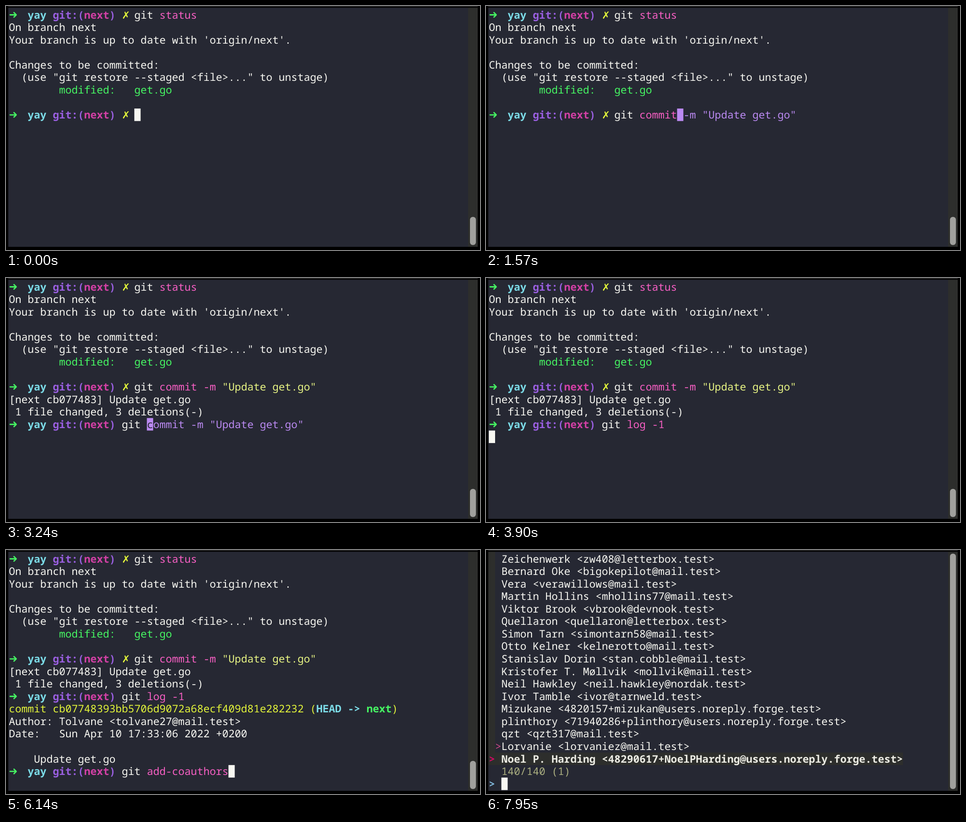
Recreate the animation shown at these times as an HTML page. Size 1041 px wide and 538 px high, loop 8000 ms.

```html
<!DOCTYPE html>
<html lang="en">
<head>
<meta charset="utf-8">
<title>Terminal session</title>
<style>
  html, body { margin: 0; width: 100%; height: 100%; overflow: hidden; background: #000; }
  svg { display: block; }
  text {
    font: 500 22.97px "Noto Sans Mono", "DejaVu Sans Mono", monospace;
    white-space: pre;
    text-rendering: geometricPrecision;
  }
  .bold { font-weight: 600; }
  .cross { font-family: "DejaVu Sans", sans-serif; font-size: 22px; }
</style>
</head>
<body>
<svg id="screen" width="1041" height="538" viewBox="0 0 1041 538"></svg>
<script>
const LOOP = 8000;
const CELL_W = 13.782, CELL_H = 27.57, LEFT = 6.2, TOP = 5.5;
const C = {
  bg: '#262833', fg: '#f8f8f2', green: '#46f663', cyan: '#7cdce8', violet: '#9a5fe0',
  magenta: '#d340a6', lime: '#e3f53a', pink: '#f85fc4', straw: '#e9f684',
  hint: '#bb8af2', panel: '#2d2e2c', thumb: '#a0a09d', count: '#abaf80',
  current: '#ecece4', pointer: '#cf0b62', marker: '#d24a86', blue: '#7fb6d9'
};

const x = col => LEFT + col * CELL_W;
const y = row => TOP + row * CELL_H;
const esc = s => s.replace(/&/g, '&amp;').replace(/</g, '&lt;').replace(/>/g, '&gt;');
const rect = (left, top, w, h, fill, r = 0) =>
  `<rect x="${left}" y="${top}" width="${w}" height="${h}" rx="${r}" fill="${fill}"/>`;
const text = (row, col, s, fill = C.fg, cls = '') =>
  `<text x="${x(col)}" y="${y(row) + 22}" fill="${fill}" class="${cls}">${esc(s)}</text>`;
const bold = (row, col, s, fill) => text(row, col, s, fill, 'bold');
const cursor = (row, col, fill = C.fg) => rect(x(col), y(row), CELL_W, CELL_H, fill);

function backdrop(thumbTop) {
  return rect(0, 0, 1041, 538, '#000') + rect(5, 0, 1031, 2, '#262626') +
    rect(5, 4, 1010, 527, C.bg) + rect(1015, 4, 21, 527, C.panel) +
    rect(1019, thumbTop, 13, 527 - thumbTop, C.thumb, 6);
}

function prompt(row, dirty) {
  const mid = y(row) + 14;
  return `<path d="M9 ${mid}H22M17.5 ${mid - 5}l5 5l-5 5" fill="none" stroke="${C.green}"
      stroke-width="2.8" stroke-linecap="round" stroke-linejoin="round"/>` +
    bold(row, 3, 'yay', C.cyan) + bold(row, 7, 'git:(', C.violet) +
    bold(row, 12, 'next', C.magenta) + bold(row, 16, ')', C.violet) +
    (dirty ? text(row, 18, '✗', C.lime, 'cross') : '');
}

// Program name white, quoted strings yellow, other arguments pink.
function command(row, col, typed) {
  return [...typed.matchAll(/"[^"]*"?|\S+/g)].map(m => {
    const fill = m.index === 0 ? C.fg : m[0][0] === '"' ? C.straw : C.pink;
    return text(row, col + m.index, m[0], fill);
  }).join('');
}

// Command being edited, with the history hint behind the cursor.
function editor(row, col, full, n, history = full) {
  const hint = n ? history.slice(n) : '';
  const at = col + n;
  let out = command(row, col, full.slice(0, n)) + cursor(row, at, hint ? C.hint : C.fg);
  if (hint) out += text(row, at, hint[0], C.bg) + text(row, at + 1, hint.slice(1), C.hint);
  return out;
}

const COMMIT = 'git commit -m "Update get.go"';
const LOG = 'git log -1';
const ADD = 'git add-coauthors';
const COMMIT_KEYS = [290, 480, 670, 810, 950, 1140, 1290, 1380, 1430, 1570];
const LOG_KEYS = [2950, 3050, 3140, 3240, 3290, 3430, 3520, 3620, 3710, 3810];
const ADD_KEYS = [5050, 5100, 5190, 5240, 5290, 5430, 5570, 5710, 5760, 5760];
const T = {
  acceptCommit: 1760, runCommit: 2140, runLog: 3900, showLog: 3950,
  acceptAdd: 6140, openList: 6380, moveUp: 7430, mark: 7900
};
const typedBy = (keys, t) => keys.filter(k => k <= t).length;

function shell(t) {
  let out = backdrop(465) + prompt(0, true) + command(0, 20, 'git status') +
    text(1, 0, 'On branch next') +
    text(2, 0, "Your branch is up to date with 'origin/next'.") +
    text(4, 0, 'Changes to be committed:') +
    text(5, 2, '(use "git restore --staged <file>..." to unstage)') +
    text(6, 8, 'modified:   get.go', C.green) + prompt(8, true);

  if (t < T.runCommit) {
    const n = t < T.acceptCommit ? typedBy(COMMIT_KEYS, t) : COMMIT.length;
    return out + editor(8, 20, COMMIT, n);
  }
  out += command(8, 20, COMMIT) + text(9, 0, '[next cb077483] Update get.go') +
    text(10, 1, '1 file changed, 3 deletions(-)') + prompt(11);

  if (t < T.runLog) {
    const n = typedBy(LOG_KEYS, t);
    return out + editor(11, 18, LOG, n, n < 5 ? COMMIT : LOG);
  }
  out += command(11, 18, LOG);
  if (t < T.showLog) return out + cursor(12, 0);

  out += text(12, 0, 'commit cb07748393bb5706d9072a68ecf409d81e282232 (', C.lime) +
    bold(12, 49, 'HEAD -> ', C.cyan) + bold(12, 57, 'next', C.green) + text(12, 61, ')', C.lime) +
    text(13, 0, 'Author: Tolvane <tolvane27@mail.test>') +
    text(14, 0, 'Date:   Sun Apr 10 17:33:06 2022 +0200') +
    text(16, 4, 'Update get.go') + prompt(17);
  const n = t < T.acceptAdd ? typedBy(ADD_KEYS, t) : ADD.length;
  return out + editor(17, 18, ADD, n, n < 5 ? LOG : ADD);
}

const PEOPLE = [
  'Zeichenwerk <zw408@letterbox.test>',
  'Bernard Oke <bigokepilot@mail.test>',
  'Vera <verawillows@mail.test>',
  'Martin Hollins <mhollins77@mail.test>',
  'Viktor Brook <vbrook@devnook.test>',
  'Quellaron <quellaron@letterbox.test>',
  'Simon Tarn <simontarn58@mail.test>',
  'Otto Kelner <kelnerotto@mail.test>',
  'Stanislav Dorin <stan.cobble@mail.test>',
  'Kristofer T. Møllvik <mollvik@mail.test>',
  'Neil Hawkley <neil.hawkley@nordak.test>',
  'Ivor Tamble <ivor@tarnweld.test>',
  'Mizukane <4820157+mizukan@users.noreply.forge.test>',
  'plinthory <71940286+plinthory@users.noreply.forge.test>',
  'qzt <qzt317@mail.test>',
  'Lorvanie <lorvaniez@mail.test>',
  'Noel P. Harding <48290617+NoelPHarding@users.noreply.forge.test>'
];

function picker(t) {
  const marked = t >= T.mark;
  const current = t >= T.moveUp && !marked ? 15 : 16;
  const width = (PEOPLE[current].length + 2) * CELL_W;
  return backdrop(8) + rect(5, 4, 15, y(17) - 4, C.panel) +
    rect(LEFT, y(current), width, CELL_H, C.panel) +
    PEOPLE.map((p, row) => row === current ? bold(row, 2, p, C.current) : text(row, 2, p)).join('') +
    bold(current, 0, '>', C.pointer) +
    (marked ? text(15, 1, '>', C.marker) : '') +
    text(17, 2, `140/140 (${marked ? 1 : 0})`, C.count) +
    bold(18, 0, '>', C.blue) + cursor(18, 2);
}

const screen = document.getElementById('screen');
const start = performance.now();
let shown = '';

function draw() {
  const t = (performance.now() - start) % LOOP;
  const markup = t < T.openList ? shell(t) : picker(t);
  if (markup !== shown) screen.innerHTML = shown = markup;
  requestAnimationFrame(draw);
}
draw();
</script>
</body>
</html>
```
